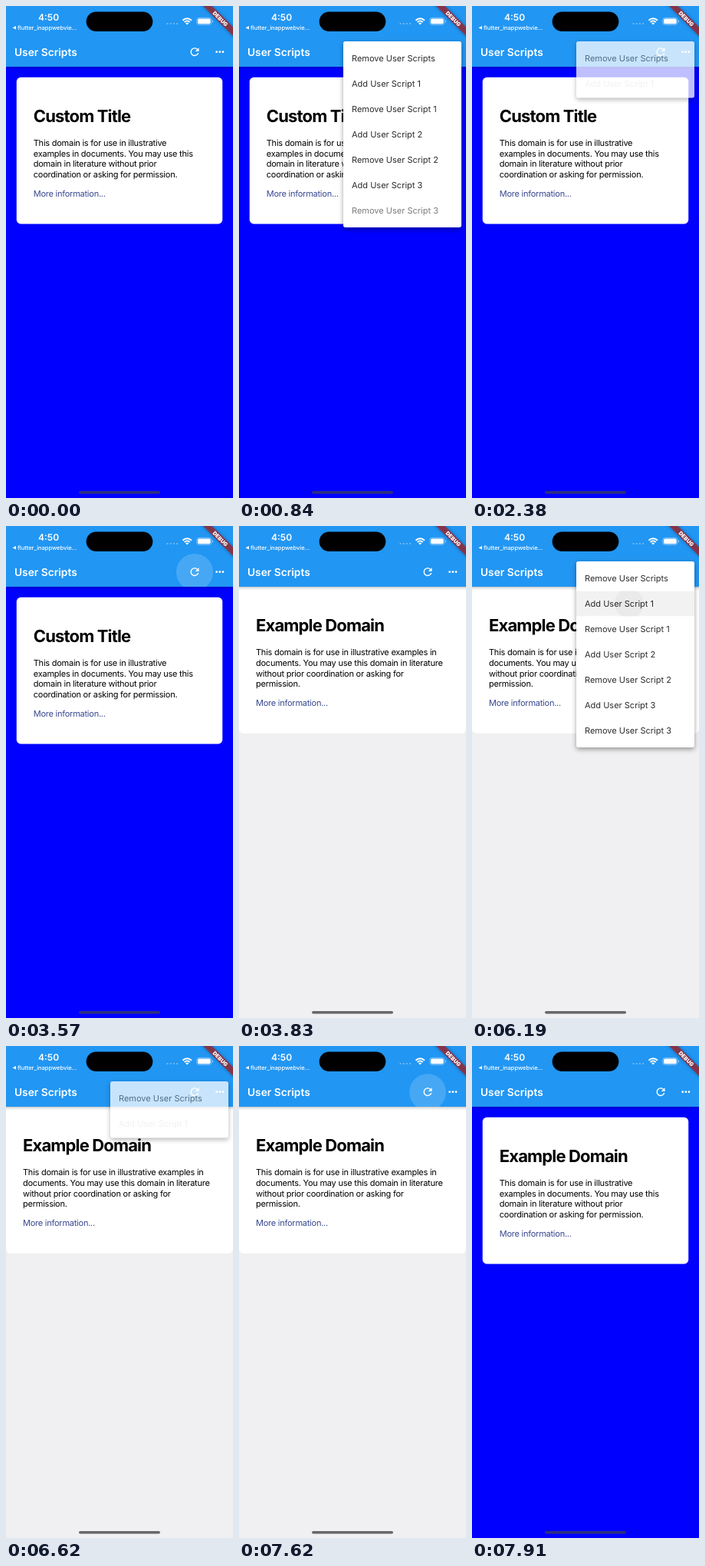
These frames come from a looping animation (296x640 px, 8000 ms). An HTML page with a canvas:

```html
<!DOCTYPE html>
<html lang="en">
<head>
<meta charset="utf-8">
<title>User Scripts</title>
<style>
html, body { margin: 0; width: 100%; height: 100%; overflow: hidden; background: #00f; }
canvas { display: block; width: 296px; height: 640px; }
</style>
</head>
<body>
<canvas id="stage"></canvas>
<script>
const W = 296, H = 640, LOOP = 8000;
const FONT = 'Inter, Roboto, "Liberation Sans", sans-serif';
const BAR = 79.1, GAP = 13.76;
const dpr = window.devicePixelRatio || 1;

function surface(canvas) {
  canvas.width = W * dpr;
  canvas.height = H * dpr;
  const c = canvas.getContext('2d');
  c.scale(dpr, dpr);
  c.textRendering = 'geometricPrecision';
  return c;
}
const ctx = surface(document.getElementById('stage'));
const layer = surface(document.createElement('canvas'));

// The screen refreshes only at these moments.
const TICKS = [0, 500, 610, 730, 840, 1950, 2060, 2170, 2280, 2380, 2890,
  3260, 3360, 3470, 3570, 3830, 5300, 5400, 5500, 6190, 6300, 6410, 6520, 6620,
  7310, 7410, 7510, 7620, 7720, 7910];

const MENUS = [
  { open: 560, close: 2155, until: 2890, tap: 1920, row: 0, x: 200 },
  { open: 5200, close: 6395, until: 7310, tap: 6160, row: 1, x: 205 }
];
const REFRESH = [{ at: 3230, until: 3830 }, { at: 7380, until: 7910 }];
const MORE = [460, 5060];

const ITEMS = ['Remove User Scripts'];
for (let i = 1; i <= 3; i++) ITEMS.push('Add User Script ' + i, 'Remove User Script ' + i);

const BODY = {
  narrow: ['This domain is for use in illustrative',
    'examples in documents. You may use this',
    'domain in literature without prior',
    'coordination or asking for permission.'],
  wide: ['This domain is for use in illustrative examples in',
    'documents. You may use this domain in literature',
    'without prior coordination or asking for',
    'permission.']
};

const clamp = v => Math.max(0, Math.min(1, v));
const span = (v, a, b) => clamp((v - a) / (b - a));
const easeOut = v => 1 - (1 - v) ** 3;

function text(c, str, x, y, size, color, weight = 400, spacing = 0) {
  c.font = `${weight} ${size}px ${FONT}`;
  c.letterSpacing = spacing + 'px';
  c.fillStyle = color;
  c.fillText(str, x, y);
}

function box(c, x, y, w, h, r, color) {
  c.fillStyle = color;
  c.beginPath();
  c.roundRect(x, y, w, h, r);
  c.fill();
}

function shadowBox(c, x, y, w, h, r, color, shadow, blur, drop) {
  c.save();
  c.shadowColor = shadow;
  c.shadowBlur = blur * dpr;
  c.shadowOffsetY = drop * dpr;
  box(c, x, y, w, h, r, color);
  c.restore();
}

function disc(c, x, y, r, color) {
  c.fillStyle = color;
  c.beginPath();
  c.arc(x, y, r, 0, Math.PI * 2);
  c.fill();
}

function drawPage(title, blue) {
  const dx = blue ? GAP : 0;
  box(ctx, 0, 79, W, H - 79, 0, blue ? '#0000ff' : '#f0f0f2');
  box(ctx, dx, BAR + dx, W - 2 * dx, 190.6, blue ? 5.5 : [0, 0, 5.5, 5.5], '#fff');
  ctx.save();
  ctx.translate(22 + dx, dx);
  text(ctx, title, 0, 137, 22, '#000', 700, -0.85);
  BODY[blue ? 'narrow' : 'wide'].forEach((line, i) =>
    text(ctx, line, 0, 168 + i * 13.76, 11, '#000', 400, -0.24));
  text(ctx, 'More information...', 0, 234, 11, '#38488f', 400, -0.24);
  ctx.restore();
  box(ctx, 95, 631.1, 106, 3.4, 1.7, blue ? '#30307c' : '#68686a');
}

function drawStatus() {
  text(ctx, '4:50', 42, 19.3, 12, '#fff', 600);
  ctx.beginPath();
  ctx.moveTo(8.5, 28.3);
  ctx.lineTo(13, 26);
  ctx.lineTo(13, 30.6);
  ctx.fill();
  text(ctx, 'flutter_inappwebvie...', 15, 30.8, 7.6, '#fff', 500, -0.05);
  box(ctx, 104.65, 7.6, 86.7, 25.5, 12.75, '#000');

  for (let i = 0; i < 4; i++) disc(ctx, 210.5 + i * 4.2, 23, 1.1, 'rgba(255,255,255,.4)');

  // wifi
  ctx.strokeStyle = '#fff';
  ctx.lineWidth = 2;
  for (const r of [4.9, 8.1]) {
    ctx.beginPath();
    ctx.arc(236.2, 24.4, r, -Math.PI * 0.75, -Math.PI * 0.25);
    ctx.stroke();
  }
  ctx.fillStyle = '#fff';
  ctx.beginPath();
  ctx.moveTo(236.2, 24.6);
  ctx.arc(236.2, 24.6, 2.9, -Math.PI * 0.75, -Math.PI * 0.25);
  ctx.fill();

  // battery
  ctx.strokeStyle = 'rgba(255,255,255,.5)';
  ctx.lineWidth = 0.8;
  ctx.beginPath();
  ctx.roundRect(248.8, 15.4, 19, 9, 2.8);
  ctx.stroke();
  box(ctx, 250, 16.6, 16.6, 6.6, 1.7, '#fff');
  box(ctx, 268.9, 18.4, 1.1, 3, 0.6, 'rgba(255,255,255,.5)');
}

function ripple(x, age, alpha) {
  if (age < 0 || alpha <= 0) return;
  ctx.save();
  ctx.beginPath();
  ctx.rect(0, 36, W, BAR - 36);
  ctx.clip();
  disc(ctx, x, 60, 8 + 16 * easeOut(span(age, 0, 300)), `rgba(255,255,255,${0.17 * alpha})`);
  ctx.restore();
}

const refreshIcon = new Path2D('M17.65 6.35C16.2 4.9 14.21 4 12 4c-4.42 0-7.99 3.58-7.99 8s3.57 8 7.99 8c3.73 0 6.84-2.55 7.73-6h-2.08c-.82 2.33-3.04 4-5.65 4-3.31 0-6-2.69-6-6s2.69-6 6-6c1.66 0 3.14.69 4.22 1.78L13 11h7V4l-2.35 2.35z');

function drawBar(t) {
  shadowBox(ctx, -10, -10, W + 20, BAR + 10, 0, '#2196f3', 'rgba(0,0,0,.3)', 4, 1);
  for (const p of REFRESH) if (t < p.until) ripple(246, t - p.at, 1);
  for (const at of MORE) ripple(278.7, t - at, 1 - span(t - at, 250, 380));
  text(ctx, 'User Scripts', 11, 64.8, 13.76, '#fff', 600);
  ctx.save();
  ctx.translate(237.8, 51.4);
  ctx.scale(0.688, 0.688);
  ctx.fillStyle = '#fff';
  ctx.fill(refreshIcon);
  ctx.restore();
  for (let i = -1; i <= 1; i++) disc(ctx, 278.8 + i * 4.13, 59.7, 1.4, '#fff');
  drawStatus();
}

function drawMenu(m, t) {
  if (t < m.open || t >= m.until) return;
  const p = t < m.close ? span(t, m.open, m.open + 300) : 1 - span(t, m.close, m.close + 300);
  if (p <= 0) return;
  const n = ITEMS.length, unit = 1 / (n + 1.5);
  const w = 154 * span(p, 0, unit), h = 242 * span(p, 0, unit * n);
  const left = 290 - w, top = 46;

  layer.clearRect(0, 0, W, H);
  shadowBox(layer, left, top, w, h, 2.75, '#fff', 'rgba(0,0,0,.38)', 6, 2.5);

  layer.save();
  layer.beginPath();
  layer.roundRect(left, top, w, h, 2.75);
  layer.clip();
  const age = t - m.tap;
  const ink = span(age, 0, 60) * (1 - span(age, 220, 420));
  if (ink > 0) {
    const y = top + 5.5 + m.row * 33;
    layer.beginPath();
    layer.rect(left, y, w, 33);
    layer.clip();
    layer.globalAlpha = ink;
    box(layer, left, y, w, 33, 0, 'rgba(188,188,188,.4)');
    disc(layer, m.x, y + 16.5, 10 + 120 * span(age, 0, 400), 'rgba(200,200,200,.4)');
  }
  layer.restore();

  layer.save();
  layer.beginPath();
  layer.rect(left, top, w, h);
  layer.clip();
  ITEMS.forEach((label, i) => {
    const start = (i + 1) * unit;
    layer.globalAlpha = span(p, start, start + 1.5 * unit);
    text(layer, label, left + 11, 72 + i * 33, 11, 'rgba(0,0,0,.83)');
  });
  layer.restore();

  ctx.globalAlpha = span(p, 0, 1 / 3);
  ctx.drawImage(layer.canvas, 0, 0, W, H);
  ctx.globalAlpha = 1;
}

function drawBanner() {
  ctx.save();
  ctx.translate(W, 0);
  ctx.rotate(Math.PI / 4);
  shadowBox(ctx, -45, 19.3, 90, 8.25, 0, 'rgba(183,28,28,.68)', 'rgba(0,0,0,.5)', 4, 0);
  ctx.textAlign = 'center';
  text(ctx, 'DEBUG', 0, 26, 7, '#fff', 900);
  ctx.restore();
}

function draw(now) {
  const t = TICKS.findLast(tick => tick <= now);
  const blue = t < 3830 || t >= 7910;
  drawPage(t < 3830 ? 'Custom Title' : 'Example Domain', blue);
  drawBar(t);
  for (const m of MENUS) drawMenu(m, t);
  drawBanner();
}

const began = performance.now();
function loop() {
  draw((performance.now() - began) % LOOP);
  requestAnimationFrame(loop);
}
loop();
</script>
</body>
</html>
```
